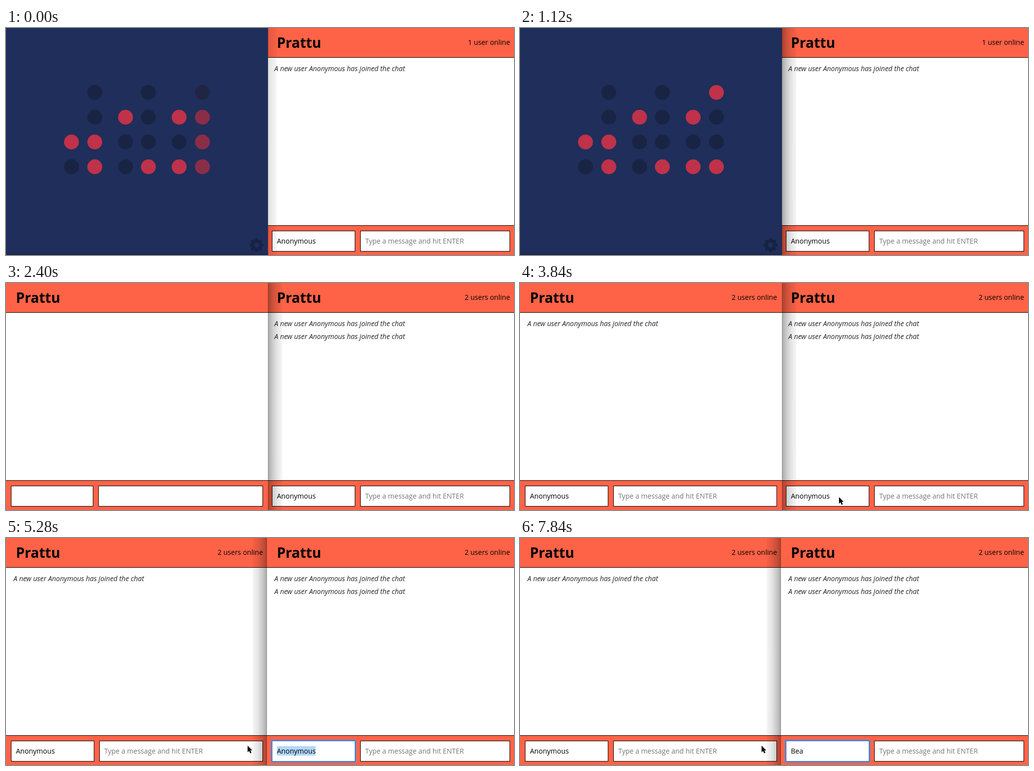
An HTML page that plays this animation: 1024x458 px, repeating every 8 s.

```html
<!DOCTYPE html>
<html lang="en">
<head>
<meta charset="utf-8">
<title>Chat demo</title>
<style>
  html, body { margin: 0; height: 100%; overflow: hidden; background: #fff; }
  svg { display: block; width: 100vw; height: 100vh; }
  text { font: 14px "Open Sans", "Noto Sans", sans-serif; white-space: pre; }
  .title { font-size: 28px; font-weight: 700; }
  .note { font-style: italic; fill: #222; }
  .hint { fill: #777; }
  .end { text-anchor: end; }
</style>
</head>
<body>
<svg id="stage" viewBox="0 0 1024 458">
  <defs>
    <linearGradient id="deep">
      <stop offset="0" stop-opacity=".34"/>
      <stop offset=".3" stop-opacity=".21"/>
      <stop offset=".65" stop-opacity=".1"/>
      <stop offset="1" stop-opacity=".035"/>
    </linearGradient>
    <linearGradient id="soft">
      <stop offset="0" stop-opacity=".12"/>
      <stop offset="1" stop-opacity=".03"/>
    </linearGradient>
    <filter id="blur" x="-10%" y="-30%" width="120%" height="160%">
      <feGaussianBlur stdDeviation="1"/>
    </filter>
  </defs>
</svg>
<script>
const LOOP = 8000, TICK = 160;
const BRAND = "Prattu", TYPED = "Bea", DEFAULT_NAME = "Anonymous";
const ON = [191, 50, 74], OFF = [25, 36, 68];
const stage = document.getElementById("stage");

function add(parent, tag, attrs = {}, content = "") {
  const node = document.createElementNS("http://www.w3.org/2000/svg", tag);
  for (const key in attrs) node.setAttribute(key, attrs[key]);
  node.textContent = content;
  return parent.appendChild(node);
}
const set = (node, attrs) => {
  for (const key in attrs) node.setAttribute(key, attrs[key]);
};
const show = (node, visible) => node.setAttribute("display", visible ? "inline" : "none");
const box = (parent, x, y, width, height, fill, more = {}) =>
  add(parent, "rect", { x, y, width, height, fill, ...more });
const label = (parent, x, y, content, cls = "") =>
  add(parent, "text", { x, y, class: cls }, content);
const clamp = v => Math.max(0, Math.min(1, v));
const ease = v => { v = clamp(v); return v * v * (3 - 2 * v); };
const mix = (a, b, k) => a + (b - a) * k;

function chatWindow(x, width, right) {
  const root = add(stage, "g", { transform: `translate(${x} 0)` });
  box(root, 0, 0, width, 458, "#fff");
  const ui = add(root, "g");
  box(ui, 0, 0, width, 59, "#ff6347");
  box(ui, 0, 59, width, 1, "#000");
  box(ui, 0, 398, width, 1, "#000");
  box(ui, 0, 399, width, 59, "#ff6347");
  label(ui, 20, 40, BRAND, "title");
  const glow = box(ui, 10, 409, 168, 42, "none",
    { stroke: "#3f8fe8", "stroke-width": 4, rx: 1, filter: "url(#blur)" });
  const field = { fill: "#fff", stroke: "#000" };
  const nameBox = box(ui, 10.5, 409.5, 167, 41, "#fff", field);
  const messageBox = box(ui, 188.5, 409.5, right - 189, 41, "#fff", field);
  const selection = box(ui, 20, 420, 78, 19, "#b2d7fd");
  const live = add(ui, "g");
  const users = label(live, right, 34, "2 users online", "end");
  const notes = [87, 113].map(y =>
    label(live, 15, y, `A new user ${DEFAULT_NAME} has joined the chat`, "note"));
  const name = label(live, 20, 435, DEFAULT_NAME);
  label(live, 198, 435, "Type a message and hit ENTER", "hint");
  const caret = box(ui, 0, 420, 1, 19, "#000");
  [glow, selection, caret].forEach(node => show(node, false));
  return { root, ui, glow, nameBox, messageBox, selection, live, users, notes, name, caret };
}

const rightChat = chatWindow(526, 500, 490);
const leftChat = chatWindow(0, 528, 518);
show(leftChat.notes[1], false);

// Binary clock: each column shows one decimal digit, lowest bit at the bottom.
const clock = add(stage, "g");
box(clock, 0, 0, 528, 458, "#1f2e5a");
box(clock, 0, 455, 528, 3, "#1a2750");
const columns = [[132, 2, 2], [179, 4, 3], [241, 3, 4], [287, 4, 1], [349, 3, 5], [396, 4, 8]];
const color = k => `rgb(${OFF.map((c, i) => Math.round(mix(c, ON[i], k)))})`;
const dots = columns.map(([cx, bits, digit]) =>
  Array.from({ length: bits }, (_, bit) =>
    add(clock, "circle", { cx, cy: 280 - 50 * bit, r: 15, fill: color(digit >> bit & 1) })));
const seconds = dots[5];

const gear = add(clock, "g", { transform: "translate(505 438)" });
add(gear, "circle", { r: 8, fill: "none", stroke: "#172244", "stroke-width": 6 });
for (let a = 0; a < 360; a += 45)
  add(gear, "path", { d: "M-3.6-10L-2.4-14H2.4L3.6-10Z", fill: "#172244", transform: `rotate(${a})` });

const shadow = box(stage, 0, 0, 29, 458, "url(#deep)");
const edge = box(stage, 0, 0, 1, 458, "#000", { opacity: .16 });
const pointer = add(stage, "path", {
  d: "M0 0V13.2L3 10.5L5.2 15.6L7.7 14.5L5.5 9.6H9.4Z",
  fill: "#000", stroke: "#fff", "stroke-width": 1, "paint-order": "stroke"
});

function pointerAt(t) {
  if (t < 4160) {
    const k = ease((t - 2960) / 880);
    return [mix(760, 643, k), mix(466, 432, k)];
  }
  const k = ease((t - 4000) / 1280);
  return [mix(643, 487, k), mix(432, 419, k)];
}

function drawClock(t) {
  show(clock, t < 2080);
  const rise = ease((t + 80) / 600);
  const fall = 1 - ease((t + 240) / 640);
  const next = t < 960 ? 0 : t < 1120 ? .5 : 1;
  seconds.forEach((dot, bit) =>
    set(dot, { fill: color(bit === 3 ? rise : bit === 0 ? Math.max(fall, next) : fall) }));
}

function drawShadow(t) {
  const rightOnTop = t >= 4000, focused = t >= 1120;
  set(shadow, {
    transform: rightOnTop ? "translate(526 0) scale(-1 1)" : "translate(528 0)",
    width: focused ? 29 : 18,
    fill: focused ? "url(#deep)" : "url(#soft)"
  });
  set(edge, { x: rightOnTop ? 525 : 528 });
}

function drawLeft(t) {
  const ready = t >= 2560;
  show(leftChat.ui, t >= 2240);
  show(leftChat.live, ready);
  set(leftChat.nameBox, { width: ready ? 167 : 165 });
  set(leftChat.messageBox, { x: ready ? 188.5 : 186.5, width: ready ? 329 : 331 });
}

function drawRight(t, pointerX) {
  const joined = t >= 2400, focused = t >= 4000, typing = t >= 6880;
  rightChat.users.textContent = joined ? "2 users online" : "1 user online";
  show(rightChat.notes[1], joined);
  show(rightChat.glow, focused);
  set(rightChat.nameBox, { stroke: focused ? "#3d6fb5" : "#000" });
  const count = t < 7200 ? 1 : t < 7360 ? 2 : 3;
  rightChat.name.textContent = typing ? TYPED.slice(0, count) : DEFAULT_NAME;
  const from = Math.max(20, Math.min(98, pointerX - 526));
  show(rightChat.selection, focused && !typing && from < 98);
  set(rightChat.selection, { x: from, width: 98 - from });
  show(rightChat.caret, typing ? t < 7840 : focused && from === 98);
  set(rightChat.caret, { x: 20 + Math.round(rightChat.name.getComputedTextLength()) });
}

function draw(time) {
  const t = Math.floor(time % LOOP / TICK) * TICK;
  const [x, y] = pointerAt(t);
  drawClock(t);
  drawShadow(t);
  drawLeft(t);
  drawRight(t, x);
  show(pointer, t >= 3040);
  set(pointer, { transform: `translate(${x} ${y})` });
}

const start = performance.now();
function loop(now) {
  draw(Math.max(0, now - start));
  requestAnimationFrame(loop);
}
draw(0);
requestAnimationFrame(loop);
</script>
</body>
</html>
```
